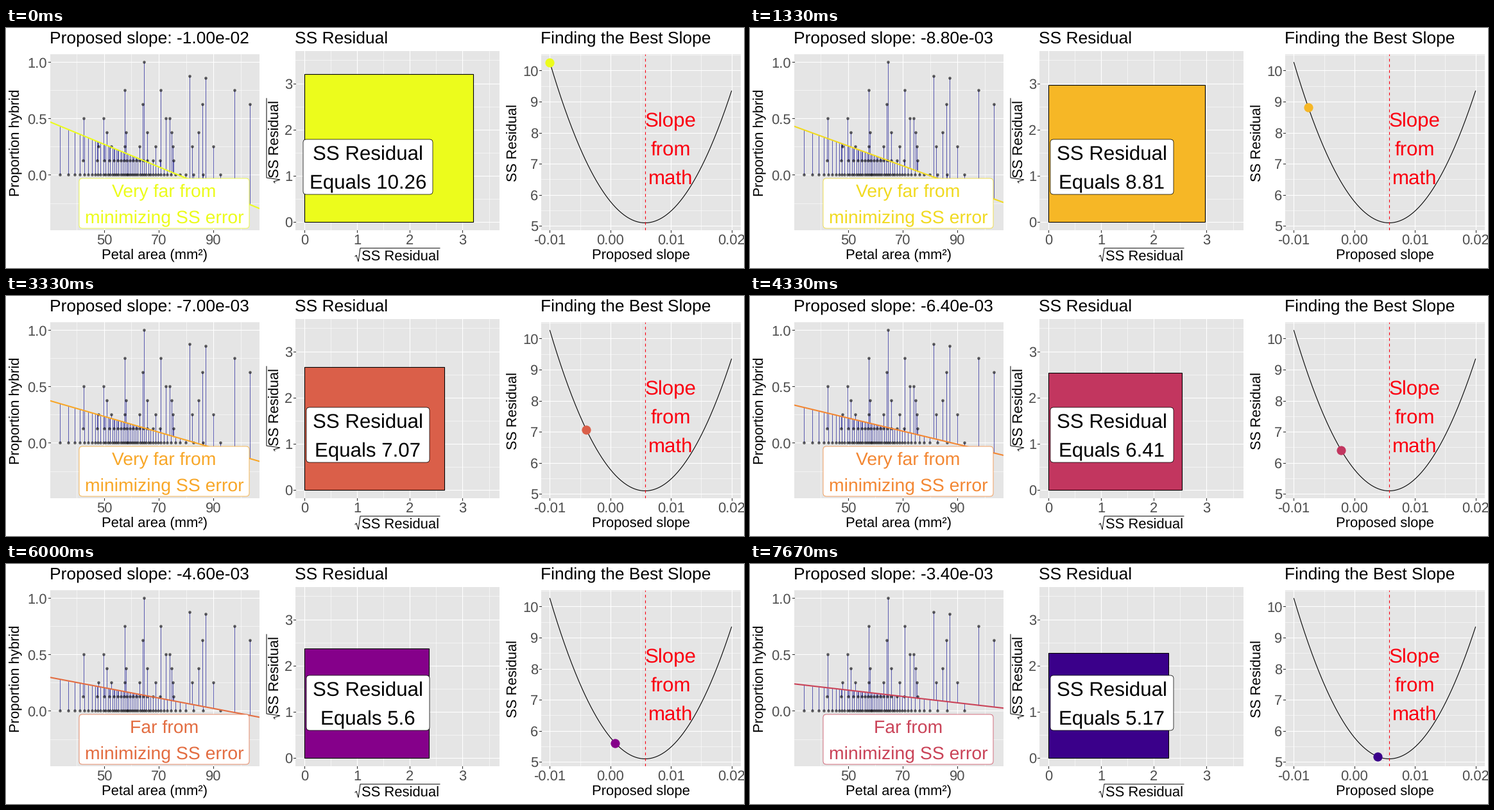
These frames come from a looping animation (1150x375 px, 8 s). A matplotlib script:

```python
import numpy as np
import matplotlib.pyplot as plt
from matplotlib.animation import FuncAnimation
from matplotlib.colors import LinearSegmentedColormap
from matplotlib.patches import FancyBboxPatch, Rectangle

W, H, DPI = 1150, 375, 100
LOOP_MS, INTERVAL, STEPS = 8000, 40, 24
PT = 72 / DPI  # points per pixel

plt.rcParams["font.family"] = "Liberation Sans"
plt.rcParams["text.hinting"] = "none"


def bell(n, middle, scale, low, high):
    """Logistic quantiles: dense in the middle, sparse in the tails."""
    p = np.linspace(low, high, n)
    return middle + scale * np.log(p / (1 - p))


# Petal areas grouped by proportion of hybrid seeds
AREAS = {
    0: bell(47, 59, 8.6, 0.05, 0.98),
    1 / 8: bell(18, 58.9, 5, 0.035, 0.965),
    1 / 4: np.geomspace(48, 90, 8),
    3 / 8: np.geomspace(51, 84.7, 5),
    1 / 2: [42.5, 49.7, 72.6, 74],
    5 / 8: [64.1, 86.1, 103.3],
    3 / 4: [57.6, 70.6, 97.8],
    6 / 7: [87.1],
    7 / 8: [81.4],
    1: [64.5],
}
area = np.concatenate(list(AREAS.values()))
hybrid = np.repeat(list(AREAS), [len(v) for v in AREAS.values()])
MEAN_AREA, MEAN_HYBRID = 62.1, 0.150

# Slopes are in thousandths throughout
FIRST, STEP, BEST = -10, 0.6, 5.7345
ERROR_COLORS = LinearSegmentedColormap.from_list("error", [
    (0, "#0B008A"), (0.314, "#85008A"), (0.505, "#C2365F"), (0.773, "#FB952B"), (1, "#ECFC1C")])


def ss_residual(slope):
    return 5.094 + 0.020875 * (slope - BEST) ** 2


def error_color(slope):
    return ERROR_COLORS((slope - BEST) / (FIRST - BEST))


fig = plt.figure(figsize=(W / DPI, H / DPI), dpi=DPI, facecolor="white")

# Pixel-space layer for text and labels
stage = fig.add_axes([0, 0, 1, 1], zorder=5)
stage.set(xlim=(0, W), ylim=(H, 0))
stage.axis("off")


def write(x, y, s, px=22, color="black", ha="center", rotation=0):
    return stage.text(x, y, s, fontsize=px * PT, color=color, ha=ha, va="baseline",
                      rotation=rotation, rotation_mode="anchor", zorder=3)


def title(x, s):
    return write(x - 0.7, 25, s, 26.4, ha="left")


def grid(draw, ticks):
    ticks = np.asarray(ticks)
    half = (ticks[1] - ticks[0]) / 2
    for t in (ticks[0] - half, *(ticks + half)):
        draw(t, color="white", lw=0.55 * PT, zorder=0)
    for t in ticks:
        draw(t, color="white", lw=1.1 * PT, zorder=0)


def panel(box, xlim, ylim, xticks, yticks, xfmt=str, yfmt=str):
    left, top, right, bottom = box
    ax = fig.add_axes([left / W, 1 - bottom / H, (right - left) / W, (bottom - top) / H])
    ax.set(xlim=xlim, ylim=ylim, facecolor="#E5E5E5", xticks=[], yticks=[])
    ax.spines[:].set_visible(False)
    grid(ax.axvline, xticks)
    grid(ax.axhline, yticks)
    for t in xticks:
        x = np.interp(t, xlim, (left, right))
        stage.plot([x, x], [bottom, bottom + 2.8], color="#333333", lw=1.1 * PT)
        write(x, 338, xfmt(t), color="#4D4D4D")
    for t in yticks:
        y = np.interp(t, ylim, (bottom, top))
        stage.plot([left - 2.8, left], [y, y], color="#333333", lw=1.1 * PT)
        write(left - 4.5, y + 8, yfmt(t), color="#4D4D4D", ha="right")
    return ax


def label_box(x0, y0, x1, y1):
    patch = FancyBboxPatch((x0, y0), x1 - x0, y1 - y0, facecolor="white", edgecolor="black",
                           boxstyle="round,pad=0,rounding_size=5", lw=0.75 * PT, zorder=2)
    return stage.add_patch(patch)


def radical(to_stage):
    sign = np.array([(0, 7), (2, 9), (5, -1), (8, 20), (132, 20)])
    stage.plot(*to_stage(*sign.T), color="black", lw=PT, solid_joinstyle="miter")


# Scatter with the proposed line
fit = panel((68.5, 40.5, 394.5, 316), (30.12, 106.82), (-0.491, 1.0727),
            (50, 70, 90), (0, 0.5, 1), yfmt="{:.1f}".format)
residuals = fit.vlines(area, hybrid, hybrid, color="#00008B", lw=0.8 * PT, alpha=0.75, zorder=1)
fit.scatter(area, hybrid, s=(4.6 * PT) ** 2, color="black", alpha=0.6, lw=0, zorder=2)
span = np.array(fit.get_xlim())
fit_line, = fit.plot(span, span, lw=2.1 * PT, zorder=3)
fit_title = title(69, "")
write(231.5, 361, "Petal area (mm²)")
write(21, 179, "Proportion hybrid", rotation=90)
verdict_box = label_box(114, 235, 379, 313)
verdict = write(246.5, 264, "", 28.45)
verdict_tail = write(246.5, 305, "minimizing SS error", 28.45)

# Square whose area is the residual sum of squares
area_ax = panel((451, 36, 769, 316), (-0.17, 3.70), (-0.18, 3.70), range(4), range(4))
square = area_ax.add_patch(Rectangle((0, 0), 1, 1, edgecolor="black", lw=1.1 * PT, zorder=2))
title(451, "SS Residual")
write(615, 364, "SS Residual")
radical(lambda u, v: (544 + u, 364 - v))
write(426, 173, "SS Residual", rotation=90)
radical(lambda u, v: (426 - v, 242 - u))
ss_box = label_box(468, 174, 660, 260)
write(564, 206, "SS Residual", 31.3)
ss_text = write(564, 250.5, "", 31.3)

# Residual sum of squares against slope
search = panel((834, 40.5, 1144.5, 316), (-11.43, 21.48), (4.856, 10.536),
               (-10, 0, 10, 20), range(5, 11), xfmt=lambda t: f"{t / 1000:.2f}")
slopes = np.linspace(-10, 20, 200)
search.plot(slopes, ss_residual(slopes), color="black", lw=1.1 * PT, zorder=2)
search.axvline(BEST, color="#FB0010", lw=1.1 * PT, dashes=(4, 4), zorder=2)
marker, = search.plot([], [], "o", ms=14.2 * PT, mew=0, zorder=3)
title(834, "Finding the Best Slope")
write(989, 361, "Proposed slope")
write(797, 179, "SS Residual", rotation=90)
for row, word in enumerate(("Slope", "from", "math")):
    write(1036, 154 + 45 * row, word, 31.3, color="#FB0010")


def show_fit(titled, slope):
    def predict(x):
        return MEAN_HYBRID + slope / 1000 * (x - MEAN_AREA)

    fit_title.set_text(f"Proposed slope: {titled / 1000:.2e}")
    fit_line.set_ydata(predict(span))
    ends = np.stack([area, hybrid, area, predict(area)], axis=1)
    residuals.set_segments(ends.reshape(-1, 2, 2))
    verdict.set_text("Very far from" if slope < -5 else "Far from")
    for artist in (fit_line, verdict, verdict_tail):
        artist.set_color(error_color(slope))
    verdict_box.set_edgecolor(error_color(slope))


def show_error(slope):
    ss, color = ss_residual(slope), error_color(slope)
    square.set(width=ss ** 0.5, height=ss ** 0.5, facecolor=color)
    half = 101 if ss >= 10 else 96
    ss_box.set_x(564 - half)
    ss_box.set_width(2 * half)
    ss_text.set_text(f"Equals {round(ss, 2):g}")
    marker.set_data([slope], [ss])
    marker.set_color(color)


def update(frame):
    # A step that falls inside a frame's interval shows from its start
    step = int((frame + 0.9) * INTERVAL * STEPS / LOOP_MS)
    # The line moves on odd steps, its title follows one step later
    show_fit(FIRST + STEP * (step // 2), FIRST + STEP * ((step + 1) // 2))
    show_error(FIRST + STEP * step)
    return []


anim = FuncAnimation(fig, update, frames=LOOP_MS // INTERVAL, interval=INTERVAL,
                     repeat=True, repeat_delay=0, blit=False)
plt.show()
```
